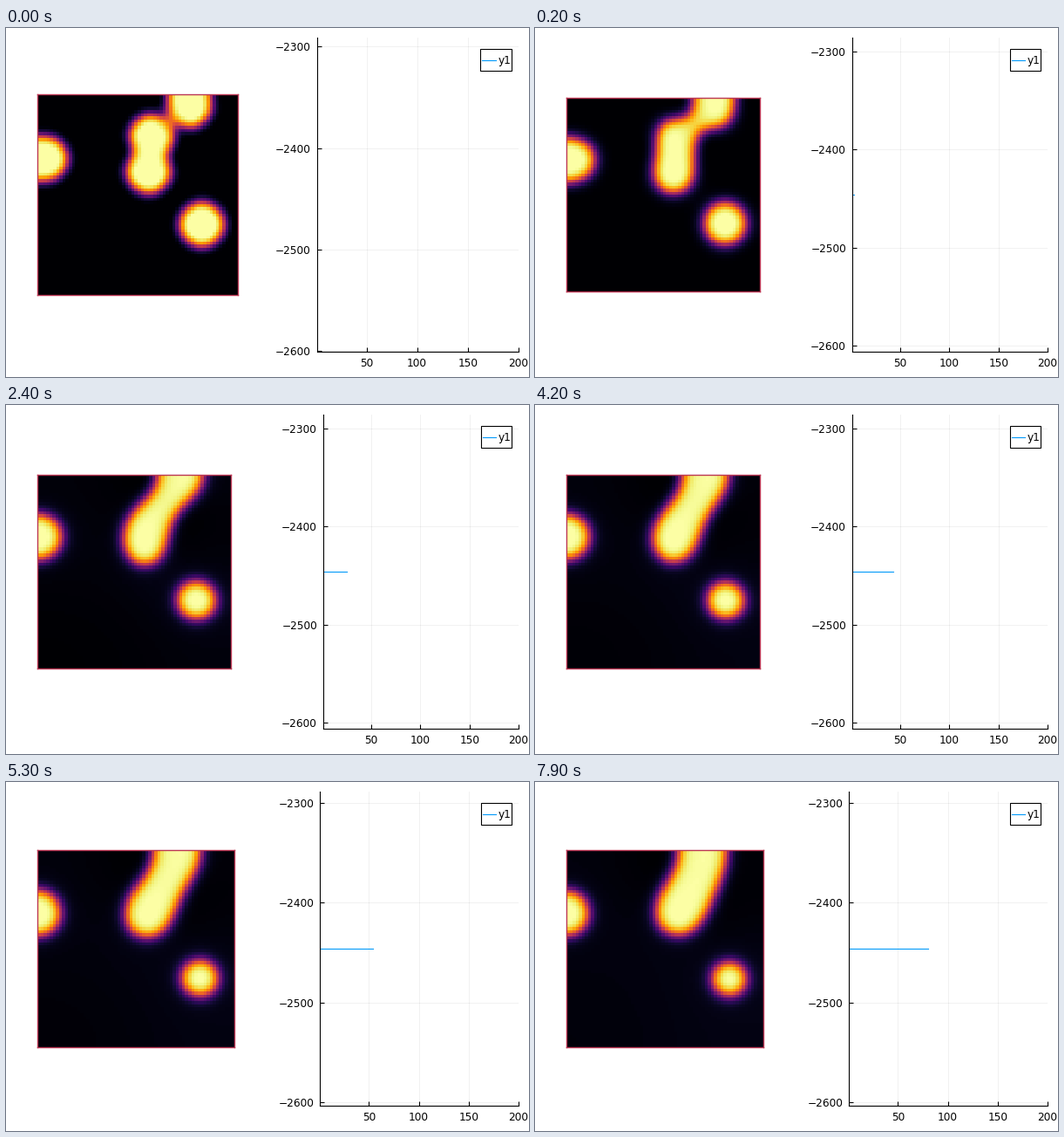
A matplotlib script that plays this animation: 600 px wide and 400 px high, repeating every 8000 ms.

```python
import numpy as np
import matplotlib.pyplot as plt
from matplotlib.animation import FuncAnimation

W, H, DPI = 600, 400, 100
PT = 72 / DPI
FRAMES = 80
BLUE = "#009afa"
plt.rcParams["font.family"] = "DejaVu Sans"
plt.rcParams["font.size"] = 12.1 * PT

# Cahn-Hilliard on an N x N grid with no-flux walls (cosine transform)
N, DT, KAPPA, STAB = 64, 0.1, 2.5, 1.0
FIRST, STEPS = 15, 45
DISCS = [(48, 3), (36, 13), (35, 24), (52, 41), (2, 20)]
RADIUS = 7.1

# Stage geometry in pixels
TOP, RIGHT, BOTTOM = 11, 588, 371
MAP_LEFT, MIDDLE = 36, 191
ENERGY = -2445.9


def evolve():
    k = np.arange(N)
    dct = np.sqrt(2 / N) * np.cos(np.pi * np.outer(k, k + 0.5) / N)
    dct[0] /= np.sqrt(2)
    eig = 2 - 2 * np.cos(np.pi * k / N)
    lap = eig[:, None] + eig[None, :]
    damp = 1 + DT * lap * (STAB + KAPPA * lap)

    y, x = np.mgrid[:N, :N]
    u = np.zeros((N, N))
    for cx, cy in DISCS:
        u[np.hypot(x - cx, y - cy) <= RADIUS] = 1
    uh = dct @ u @ dct.T
    fields = []
    for n in range(FRAMES):
        for _ in range(STEPS if n else FIRST):
            force = 2 * u * (1 - u) * (1 - 2 * u) - STAB * u
            uh = (uh - DT * lap * (dct @ force @ dct.T)) / damp
            u = dct.T @ uh @ dct
        fields.append(u.copy())
    return fields


def margin(n):
    """Extra left margin of the plot, which jumps as the tick labels change."""
    if n == 0:
        return 0
    return 7.5 if n < 44 else 3.75


def place(ax, l, t, r, b):
    ax.set_position([l / W, 1 - b / H, (r - l) / W, (b - t) / H])


fields = evolve()
fig = plt.figure(figsize=(W / DPI, H / DPI), dpi=DPI, facecolor="white")

heat = fig.add_axes([0, 0, 1, 1])
img = heat.imshow(fields[0], cmap="inferno", vmin=0, vmax=1,
                  interpolation="nearest", aspect="auto")
heat.set(xticks=[], yticks=[])
for s in heat.spines.values():
    s.set(color="#bc3754", linewidth=1.4 * PT)

plot = fig.add_axes([0, 0, 1, 1])
plot.spines[["top", "right"]].set_visible(False)
plot.spines[["left", "bottom"]].set_linewidth(1.1 * PT)
plot.set(xlim=(1, 200), xticks=range(50, 201, 50), yticks=range(-2600, -2299, 100))
plot.set_axisbelow(True)
plot.grid(color="black", alpha=0.07, linewidth=0.8 * PT)
plot.tick_params(direction="in", length=5 * PT, width=1.1 * PT, pad=7 * PT)
curve, = plot.plot([], [], color=BLUE, linewidth=1.1 * PT)

over = fig.add_axes([0, 0, 1, 1])
over.set(xlim=(0, W), ylim=(H, 0))
over.axis("off")
box = over.add_patch(plt.Rectangle((0, 0), 1, 1, fc="white", ec="black", lw=1.1 * PT))
key, = over.plot([], [], color=BLUE, linewidth=1.1 * PT)
over.text(564.2, 41, "y1", va="baseline")


def draw(n):
    left = 356.5 + margin(n)
    side = 230 - margin(n) * 1.07
    place(heat, MAP_LEFT, MIDDLE - side / 2, MAP_LEFT + side, MIDDLE + side / 2)
    place(plot, left, TOP, RIGHT, BOTTOM)

    # Both axes share one scale, centred on the energy
    scale = (RIGHT - left) / 199
    half = (BOTTOM - TOP) / scale / 2
    plot.set_ylim(ENERGY - half, ENERGY + half)

    legend = 580 - 0.1555 * (RIGHT - left)
    box.set_bounds(legend, 23.5, 580 - legend, 25.5)
    key.set_data([legend + 2, 562], [36.5, 36.5])
    img.set_data(fields[n])
    curve.set_data([1, n + 1], [ENERGY, ENERGY])
    return img, curve, box, key


anim = FuncAnimation(fig, draw, frames=FRAMES, interval=100, repeat=True,
                     repeat_delay=0, blit=False)
plt.show()
```
